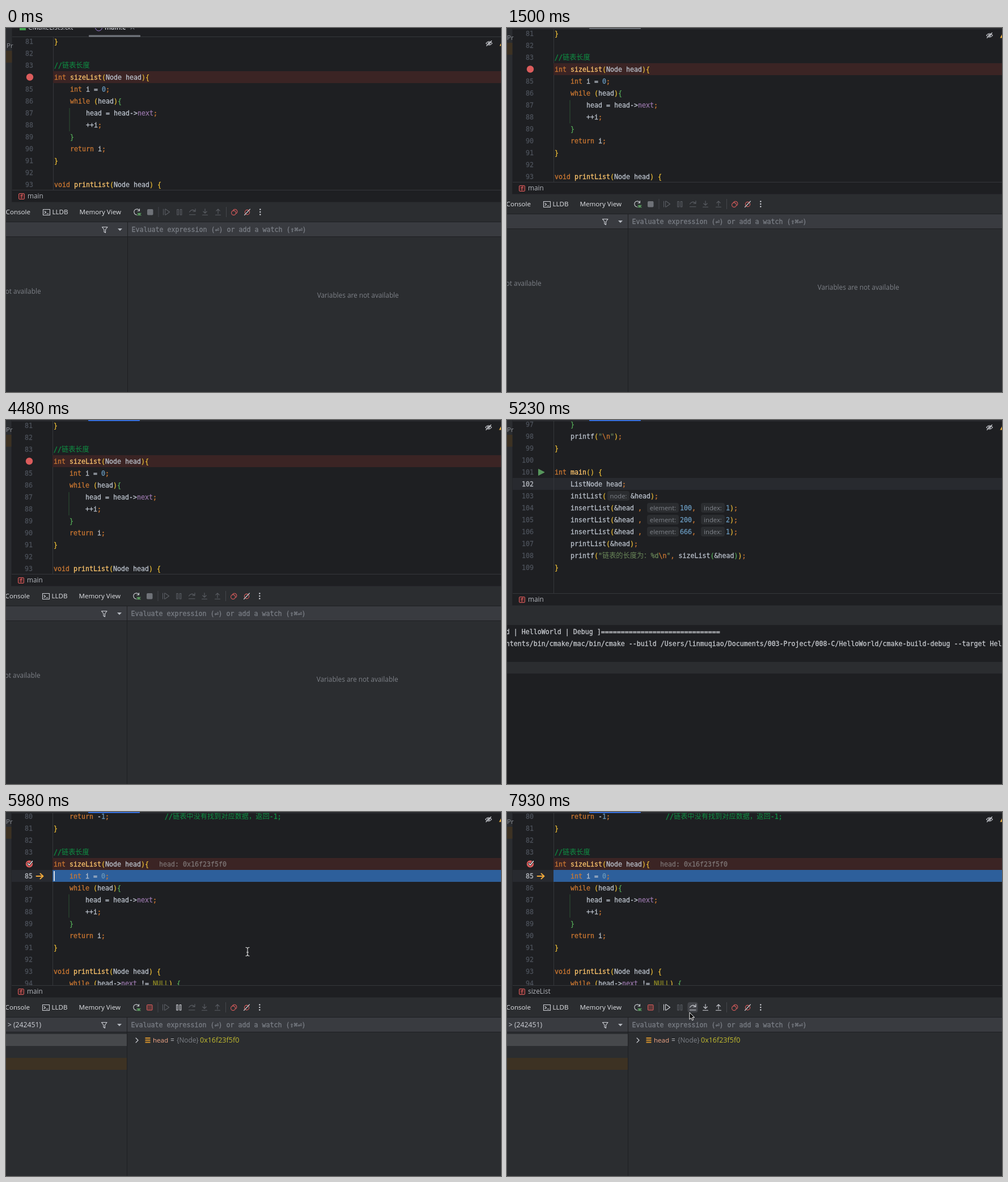
Animation of 873x641 px, one loop 8 s. Source, as an HTML page:

```html
<!DOCTYPE html>
<html lang="zh-CN">
<head>
<meta charset="utf-8">
<title>Debugger</title>
<style>
  html, body { margin: 0; width: 100%; height: 100%; overflow: hidden; background: #1e1f22; }
  svg { display: block; width: 873px; height: 641px; }
  text { white-space: pre; }
  .mono { font: 11.63px "DejaVu Sans Mono", "Noto Sans CJK SC", monospace; stroke-width: .28; }
  .cjk { font: 12.2px "Noto Sans CJK SC", "Noto Sans CJK", sans-serif; stroke-width: 0; }
  .ui { font-family: "Open Sans", "Noto Sans", sans-serif; }
  .icon { fill: none; stroke-width: 1.1; stroke-linecap: round; stroke-linejoin: round; }
</style>
</head>
<body>
<svg id="stage" viewBox="0 0 873 641" xmlns="http://www.w3.org/2000/svg"></svg>
<script>
const COL = 7, ROW = 21, CJK = 12.2, LEFT = 84, LOOP = 8000;
const C = {
  bg: '#1e1f22', panel: '#2b2d30', bar: '#393b40', line: '#35373b', text: '#bcc3cd',
  key: '#cc7832', fn: '#ffc66d', num: '#6897bb', field: '#9876aa', note: '#0f8f43',
  str: '#6a8759', macro: '#908b25', yellow: '#e8ba36', green: '#54a857', row: '#282a2f',
  gutter: '#4b5059', bright: '#ced0d6', dim: '#5a5d63', red: '#db5c5c', brown: '#3d3223'
};

const tag = (name, attrs, body = '') =>
  `<${name} ${Object.entries(attrs).map(([k, v]) => `${k}="${v}"`).join(' ')}>${body}</${name}>`;
const esc = s => s.replace(/&/g, '&amp;').replace(/</g, '&lt;').replace(/>/g, '&gt;');
const rect = (x, y, width, height, fill, more) => tag('rect', { x, y, width, height, fill, ...more });
const icon = (d, stroke, more) => tag('path', { d, class: 'icon', stroke, ...more });
const group = (id, body, more) => tag('g', { id, ...more }, body);
const mono = (x, mid, s, fill, more) =>
  tag('text', { x, y: mid + 4, class: 'mono', fill, stroke: fill, ...more }, esc(s));
const ui = (x, mid, s, fill, size = 11.8, more) =>
  tag('text', { x, y: mid + 4.2, class: 'ui', fill, 'font-size': size, ...more }, esc(s));

const TOKEN = new RegExp([
  '(?<note>//.*)', '(?<str>"[^"]*")', '(?<fn>(?<=^(?:int|void) )\\w+)',
  '(?<key>\\b(?:int|void|while|return)\\b|[;,])', '(?<macro>\\bNULL\\b)', '(?<field>\\bnext\\b)',
  '(?<pill><\\w+:>)', '(?<num>\\b\\d+)', '(?<open>[({])', '(?<close>[)}])', '(?<text>\\w+|\\s+|.)'
].join('|'), 'g');
const PILL = { node: 39, element: 56, index: 42 };

// One line of C code, coloured token by token on a fixed column grid.
function codeLine(src, mid) {
  let x = LEFT, depth = 0, out = '';
  const put = (s, fill, more) => {
    for (const run of s.match(/[\u2e80-\uffff]+|[^\u2e80-\uffff]+/g) || []) {
      const wide = run.charCodeAt(0) >= 0x2e80;
      if (run.trim()) out += mono(x, mid, run, fill, wide ? { class: 'cjk' } : more);
      x += run.length * (wide ? CJK : COL);
    }
  };
  const pill = name => {
    const w = PILL[name];
    out += rect(x + 2, mid - 9, w, 17, C.panel, { rx: 4 }) +
      ui(x + 2 + w / 2, mid - .5, name + ':', '#7f838a', 11.3, { 'text-anchor': 'middle' });
    x += w + 4;
  };
  const indented = src.startsWith(' ');
  const bracket = (s, level) => put(s, ('{}'.includes(s) ? indented : level) ? C.green : C.yellow);
  for (const m of src.matchAll(TOKEN)) {
    const s = m[0], kind = Object.keys(m.groups).find(k => m.groups[k] !== undefined);
    if (kind === 'pill') pill(s.slice(1, -2));
    else if (kind === 'open') bracket(s, s === '(' ? depth++ : 0);
    else if (kind === 'close') bracket(s, s === ')' ? --depth : 0);
    else if (kind === 'str') s.split(/(\\n)/).forEach(p => put(p, p === '\\n' ? C.key : C.str));
    else put(s, C[kind], kind === 'fn' ? { 'font-weight': 'bold', 'stroke-width': 0 } : {});
  }
  return out;
}

function listing(lines, first, top, current, skip) {
  return lines.map((src, i) => {
    const n = first + i, mid = top + i * ROW;
    const number = n === skip ? '' :
      mono(47, mid, String(n), n === current ? '#b4b8bf' : C.gutter, { 'text-anchor': 'end' });
    return number + codeLine(src, mid);
  }).join('');
}

const sizeCode = [
  '}', '', '//链表长度', 'int sizeList(Node head){', '    int i = 0;', '    while (head){',
  '        head = head->next;', '        ++i;', '    }', '    return i;', '}', '', 'void printList(Node head) {'
];
const stopCode = [
  '    return -1;              //链表中没有找到对应数据，返回-1;', ...sizeCode,
  '    while (head->next != NULL) {'
];
const insert = (value, at) => `    insertList(&head , <element:>${value}, <index:>${at});`;
const mainCode = [
  '    }', '    printf("\\n");', '}', '', 'int main() {', '    ListNode head;', '    initList(<node:>&head);',
  insert(100, 1), insert(200, 2), insert(666, 1), '    printList(&head);',
  '    printf("链表的长度为：%d\\n", sizeList(&head));', '}'
];

const guide = y => rect(110.5, y, 1, 41, '#2d5233');
const dot = y => tag('circle', { cx: 41, cy: y, r: 6.2, fill: C.red });
const redRow = y => rect(82, y, 800, ROW, '#3b2424');
const currentRow = rect(10, 102, 870, ROW, C.row) + rect(82, 102, 1, ROW, C.line);
const check = 'M38.5 90.5L41 93.5L46.5 86.5';

const editors =
  rect(82, 2, 1, 400, C.line) +
  group('idle', redRow(62) + listing(sizeCode, 81, 10, 0, 84) + dot(72.5) + guide(127)) +
  group('ready', currentRow + listing(mainCode, 97, 8, 102) +
    tag('path', { d: 'M55.5 86.5V97.5L66 92Z', fill: '#57965c', stroke: '#57965c', 'stroke-linejoin': 'round' })) +
  group('stopped', currentRow + redRow(81) + rect(82, 102, 800, ROW, '#2d5f9b') +
    listing(stopCode, 80, 8, 85, 84) +
    mono(270, 92, 'head: 0x16f23f5f0', '#7c7474', { 'font-style': 'italic' }) +
    dot(91.5) + icon(check, C.bg, { style: 'stroke-width:3.4' }) +
    icon(check, '#e8e8e8', { style: 'stroke-width:1.5' }) +
    icon('M53.5 113H65M60.5 108.5L65.5 113L60.5 117.5', '#f2a93b', { style: 'stroke-width:1.9' }) +
    guide(145) + rect(84, 104, 2, 17.5, '#d8dce2', { id: 'caret' }));

const tabs =
  rect(23, -22, 11, 12, '#3f9f4a') + ui(38, -15, 'CMakeLists.txt', C.bright) +
  tag('circle', { cx: 162.5, cy: -15, r: 6, fill: 'none', stroke: '#a083d8' }) +
  ui(173, -15, 'main.c', C.bright, 11.6, { 'font-weight': 600 }) +
  icon('M219 -18L225 -12M225 -18L219 -12', '#7a7e85') +
  rect(10, 1, 870, 1, C.line) + rect(145, -1.5, 91, 3.2, '#6f737a', { id: 'mark', rx: 1 });

const sides =
  rect(-5, -20, 14.5, 400, C.panel) + rect(-5, 26, 14.5, 21, C.brown) + ui(0, 16.5, 'Pr', '#8f9299', 11.5) +
  icon('M845.5 13Q851 6.5 856.5 13Q851 19.5 845.5 13ZM846.5 17.5L855.5 8.5', C.bright) +
  tag('circle', { cx: 851, cy: 13, r: 1.8, class: 'icon', stroke: C.bright }) +
  tag('path', { d: 'M869.5 17.5L874 9.5L879 17.5Z', fill: '#e3a93f' });

const crumb =
  rect(9.5, 271, 870, 22, C.bg) + rect(10, 271, 870, 1, C.line) +
  rect(21.5, 277.5, 10, 10, '#422628', { rx: 1.5, stroke: C.red }) +
  mono(26.5, 282, 'f', C.red, { 'text-anchor': 'middle', style: 'font-size:9px' }) +
  tag('text', { id: 'place', x: 37, y: 286.3, class: 'ui', fill: '#b4b7bd', 'font-size': 11.8 });

const label = (x, s, more) => ui(x, 310, s, '#e2e4e8', 11.6, { 'font-weight': 500, ...more });
const ring = (cx, cy, r) => tag('circle', { cx, cy, r, class: 'icon', stroke: C.red });
const toolbar =
  label(42, 'Console', { 'text-anchor': 'end' }) + label(80.5, 'LLDB') + label(128.5, 'Memory View') +
  icon('M64.5 305.5H76.5V315.5H64.5ZM67 308.5L69.5 310.5L67 312.5M71 313H74', C.bright) +
  icon('M234.2 307.5A5 5 0 1 0 230 315M234.5 304.5V308H231', C.bright) +
  tag('circle', { cx: 234, cy: 314, r: 2.4, fill: '#57965c' }) +
  icon('M230.8 312L237.2 316M230.8 316L237.2 312', '#57965c') +
  rect(248.5, 305.5, 9.5, 9.5, C.dim, { id: 'halt', rx: 1 }) +
  rect(267.5, 301, 1, 18, '#43454a') + rect(387, 301, 1, 18, '#43454a') +
  rect(318.5, 301, 18, 18, '#43454a', { id: 'hover', rx: 4 }) +
  group('resume', icon('M276.5 305V315M279.5 305H280.5L287.5 310L280.5 315H279.5Z', 'inherit')) +
  group('pause', icon('M300.8 305.5H303.3V315H300.8ZM306.3 305.5H308.8V315H306.3Z', 'inherit')) +
  group('step', icon('M322.5 310Q327 303.5 332.5 308.5M333 304.5V309H328.8M322.5 314.8H333' +
    'M350 304.5V312M346.8 309L350 312.2L353.2 309M345.5 315.2H354.5' +
    'M373 313V305.2M369.8 308.2L373 305L376.2 308.2M368.5 315.2H377.5', 'inherit')) +
  ring(400.5, 311.5, 3.9) + icon('M400 306.5A4 4 0 1 1 405.5 312.3', C.red) +
  ring(424.5, 310.5, 4.1) + icon('M419.5 315.5L429.5 305', C.bright) +
  [305.5, 310, 314.5].map(cy => tag('circle', { cx: 447.3, cy, r: 1.2, fill: C.bright })).join('');

const hint = (x, s) => mono(x, 341, s, '#7b7f86');
const evalRow =
  rect(-5, 327, 885, 27, C.bg) + rect(-5, 328, 885, 25, C.bar) + rect(213, 328, 1, 400, C.bg) +
  icon('M168.5 336.5H178L174.5 341V346.5L172 345V341Z', C.bright) +
  tag('path', { d: 'M196 339H204L200 343.3Z', fill: '#b4b8bf' }) +
  hint(220.5, 'Evaluate expression (') + hint(367.5, '⏎') + hint(374.5, ') or add a watch (') +
  hint(500.5, '⇧') + hint(507.5, '⌘') + hint(514.5, '⏎') + hint(521.5, ')');

const empty = group('empty',
  ui(60.5, 450, 'Frames are not available', '#7d8087', 11.8, { 'text-anchor': 'end' }) +
  ui(619.7, 457, 'Variables are not available', '#7d8087', 11.8, { 'text-anchor': 'middle' }));

const medium = { 'font-weight': 500 };
const variables = group('vars',
  ui(62, 341, '> (242451)', C.bright, 12.2, { 'text-anchor': 'end', ...medium }) +
  rect(-5, 357, 218, 21, '#46484b') + rect(-5, 399, 218, 21, C.brown) +
  icon('M229 364L233 368L229 372', C.bright) +
  [363, 366.7, 370.4].map(y => rect(245.5, y, 9, 2.2, '#c98b2d')).join('') +
  ui(259, 368, 'head', '#f0a585', 11.6, medium) + ui(290, 368, '=', C.bright, 11.8, medium) +
  ui(301, 368, '{Node}', '#7d8087') + ui(342, 368, '0x16f23f5f0', '#c3bd2f', 12.5));

const log = (mid, s) => mono(-2.3, mid, s, '#c8cbd0');
const build = group('build',
  rect(-5, 327, 885, 340, C.bg) + rect(-5, 392, 885, 20.5, C.panel) +
  log(339, 'd | HelloWorld | Debug ]' + '='.repeat(30)) +
  log(360, 'ntents/bin/cmake/mac/bin/cmake --build /Users/linmuqiao/Documents/003-Project/008-C/HelloWorld/cmake-build-debug --target HelloWorld'));

const stage = document.getElementById('stage');
stage.innerHTML = rect(0, 0, 873, 641, C.bg) + group('world',
  editors + tabs + sides +
  group('lower', crumb + rect(-5, 292.5, 885, 400, C.panel) +
    group('debug', toolbar + evalRow + empty + variables) + build)) +
  tag('path', {
    id: 'arrow', d: 'M0 0V12.2L2.8 9.6L4.7 13.8L6.7 12.9L4.8 8.8H8.6Z',
    fill: '#000', stroke: '#fff', 'stroke-linejoin': 'round'
  }) +
  icon('M-3 -7.5Q0 -7.5 0 -5V5Q0 7.5 -3 7.5M3 -7.5Q0 -7.5 0 -5V5Q0 7.5 3 7.5M-1.5 1H1.5', '#e6e6e6', { id: 'beam' });

const $ = {};
stage.querySelectorAll('[id]').forEach(e => $[e.id] = e);
const show = (id, on) => $[id].setAttribute('display', on ? 'inline' : 'none');
const set = (id, name, value) => $[id].setAttribute(name, value);
const move = (id, x, y) => set(id, 'transform', `translate(${x} ${y})`);
const at = (keys, t) => keys.filter(k => k[0] <= t).pop();

// Stepped keys: [time, ...values]
const settle = [[0, 1, 14], [150, 0.3, 6], [300, 0, 2], [450, 0, 0]];
const pointer = [
  [0], [750, 'arrow', 767, 630], [900, 'arrow', 715, 515], [1050, 'arrow', 610, 365],
  [1200, 'beam', 490, 190], [1350, 'beam', 407, 69], [1500],
  [2700, 'beam', 428, 5], [3000, 'beam', 398, 62], [3150, 'beam', 345, 135], [3300, 'beam', 313, 192],
  [3450, 'beam', 304, 209], [3890, 'beam', 335, 183], [4030, 'beam', 450, 115], [4180, 'beam', 610, 55],
  [4330, 'beam', 732, 9], [4480],
  [5830, 'beam', 426, 246], [6130, 'arrow', 371, 320], [6280, 'arrow', 360, 345], [6430, 'arrow', 350, 353],
  [6580, 'arrow', 343, 354], [6730, 'arrow', 338, 354], [6880, 'arrow', 334, 354], [7030, 'arrow', 332, 353],
  [7330, 'arrow', 329, 352], [7480, 'arrow', 326, 352], [7630, 'arrow', 324, 353], [7780, 'arrow', 322, 353]
];

function draw(t) {
  const idle = t < 5230, building = !idle && t < 5530, stopped = t >= 5830, paused = t >= 6130;
  const [, dx, dy] = at(settle, t);
  move('world', dx, dy);
  move('lower', 0, idle ? 0 : 34);
  move('empty', 0, idle ? 0 : -17);
  show('idle', idle);
  show('ready', !idle && !stopped);
  show('stopped', stopped);
  show('debug', !building);
  show('build', building);
  show('empty', !stopped);
  show('vars', stopped);
  show('caret', Math.floor((t - 5830) / 600) % 2 === 0);
  set('mark', 'fill', t < 2250 ? '#6f737a' : '#3574f0');
  set('halt', 'fill', idle ? '#6f7278' : '#5e3838');
  set('halt', 'stroke', idle ? '#6f7278' : C.red);
  $.place.textContent = paused ? 'sizeList' : 'main';
  set('resume', 'stroke', paused ? C.bright : C.dim);
  set('step', 'stroke', paused ? C.bright : C.dim);
  set('pause', 'stroke', !idle && !paused ? C.bright : C.dim);

  const [, shape, x, y] = at(pointer, t);
  for (const id of ['arrow', 'beam']) {
    show(id, id === shape);
    if (id === shape) move(id, x, y);
  }
  show('hover', paused && x < 337 && y > 335);
}

const start = performance.now();
function tick() {
  draw((performance.now() - start) % LOOP);
  requestAnimationFrame(tick);
}
draw(0);
tick();
</script>
</body>
</html>
```
